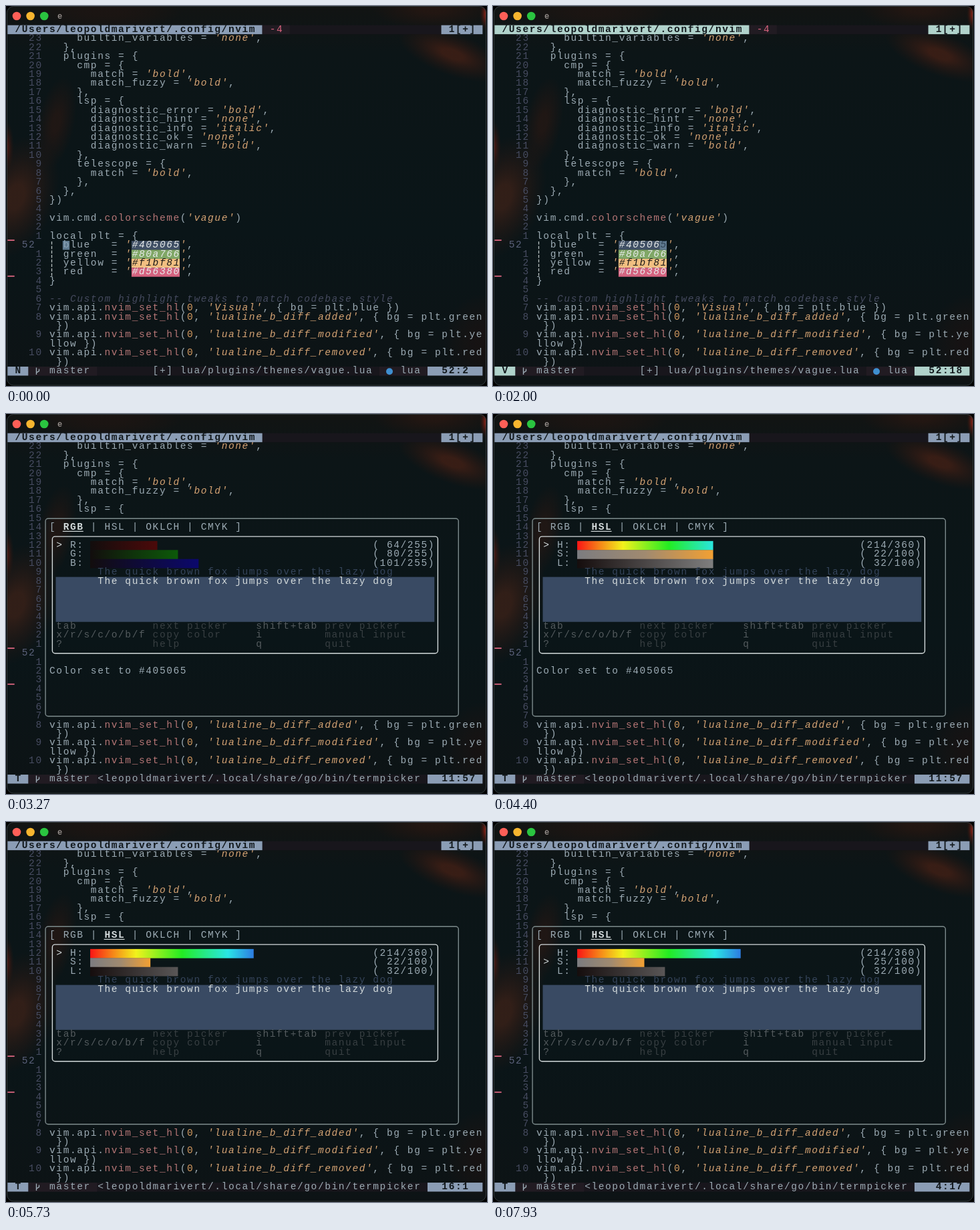
An HTML page with a canvas that plays this animation: 720x568 px, repeating every 8000 ms.

```html
<!DOCTYPE html>
<html lang="en">
<head>
<meta charset="utf-8">
<title>Colour picker in a terminal editor</title>
<style>
  html, body { margin: 0; width: 100%; height: 100%; overflow: hidden; background: #000; }
  canvas { display: block; }
</style>
</head>
<body>
<canvas id="stage" width="720" height="568"></canvas>
<script>
const ctx = document.getElementById('stage').getContext('2d');
const LOOP = 8000, LEFT = 2.4, TOP = 28.7, CELL = 10.304, ROW = 13.43;
const FONT = '14.5px "Liberation Mono", monospace';
const C = {
  text: '#9cabb4', string: '#d6a474', func: '#b67676', number: '#d39a60',
  comment: '#454a5e', lineNo: '#474c61', current: '#5a617a', red: '#d8647e',
  normal: '#8b9db5', visual: '#b0d2cb', ink: '#12181c', bar: '#18161c', barSide: '#211b22',
  popup: '#7d8b8c', white: '#d3dadb', blue: '#394a63', key: '#545b5e', hint: '#383f42'
};

const CODE = `    builtin_variables = 'none',
  },
  plugins = {
    cmp = {
      match = 'bold',
      match_fuzzy = 'bold',
    },
    lsp = {
      diagnostic_error = 'bold',
      diagnostic_hint = 'none',
      diagnostic_info = 'italic',
      diagnostic_ok = 'none',
      diagnostic_warn = 'bold',
    },
    telescope = {
      match = 'bold',
    },
  },
})

vim.cmd.colorscheme('vague')

local plt = {
  blue   = '#405065',
  green  = '#80a766',
  yellow = '#f1bf81',
  red    = '#d56380',
}

-- Custom highlight tweaks to match codebase style
vim.api.nvim_set_hl(0, 'Visual', { bg = plt.blue })
vim.api.nvim_set_hl(0, 'lualine_b_diff_added', { bg = plt.green
 })
vim.api.nvim_set_hl(0, 'lualine_b_diff_modified', { bg = plt.ye
llow })
vim.api.nvim_set_hl(0, 'lualine_b_diff_removed', { bg = plt.red
 })`.split('\n');

const colX = col => LEFT + col * CELL;
const rowY = row => TOP + row * ROW;

function fill(col, row, cols, rows, color) {
  ctx.fillStyle = color;
  ctx.fillRect(colX(col), rowY(row), cols * CELL, rows * ROW);
}

function print(col, row, text, color, style = '') {
  ctx.font = `${style} ${FONT}`;
  ctx.letterSpacing = '0px';
  const gap = CELL - ctx.measureText('0').width;
  ctx.letterSpacing = gap + 'px';
  ctx.fillStyle = color;
  ctx.fillText(text, colX(col) + gap / 2, rowY(row) + 10.1);
}

// Latest value of a [time, value] schedule.
const at = (schedule, t) => schedule.filter(([start]) => start <= t).pop()[1];

// Critically damped spring from one value to another, t in ms.
function spring(from, to, t) {
  const s = 18 * Math.max(0, t) / 1000;
  return to + (from - to) * (1 + s) * Math.exp(-s);
}

// Soft elliptical patch of the blurred wallpaper.
function glow(x, y, rx, ry, angle, color) {
  ctx.save();
  ctx.translate(x, y);
  ctx.rotate(angle);
  ctx.scale(rx, ry);
  const g = ctx.createRadialGradient(0, 0, 0.2, 0, 0, 1);
  g.addColorStop(0, color);
  g.addColorStop(1, 'rgba(60,22,12,0)');
  ctx.fillStyle = g;
  ctx.fillRect(-1, -1, 2, 2);
  ctx.restore();
}

function drawWindow() {
  ctx.fillStyle = '#000';
  ctx.fillRect(0, 0, 720, 568);
  ctx.save();
  ctx.beginPath();
  ctx.roundRect(1, 0, 718, 567, 10);
  ctx.clip();
  const g = ctx.createLinearGradient(0, 0, 0, 568);
  g.addColorStop(0, '#121413');
  g.addColorStop(0.12, '#0c1517');
  g.addColorStop(0.6, '#0a1518');
  g.addColorStop(1, '#0d1315');
  ctx.fillStyle = g;
  ctx.fillRect(0, 0, 720, 568);
  glow(668, 72, 85, 32, 0.35, 'rgba(92,36,20,.55)');
  glow(640, 5, 90, 30, 0, 'rgba(60,26,16,.4)');
  glow(150, 10, 110, 26, 0, 'rgba(45,22,16,.35)');
  glow(15, 285, 60, 95, 0.35, 'rgba(88,40,24,.5)');
  glow(75, 175, 28, 70, 0.2, 'rgba(62,26,16,.4)');
  glow(0, 210, 12, 40, 0, 'rgba(130,30,16,.5)');
  glow(719, 12, 10, 26, 0, 'rgba(190,40,24,.6)');
  glow(715, 500, 60, 70, 0, 'rgba(45,16,12,.3)');
  ctx.restore();
  ctx.strokeStyle = '#30383a';
  ctx.lineWidth = 1;
  ctx.beginPath();
  ctx.roundRect(1.5, 0.5, 717, 566.5, 10);
  ctx.stroke();
  ['#fe5f57', '#f6b52f', '#2ac440'].forEach((color, i) => dot(16 + i * 20.6, 15, 6.3, color));
  ctx.letterSpacing = '0px';
  ctx.font = 'bold 12px "Liberation Mono", monospace';
  ctx.fillStyle = '#918b88';
  ctx.fillText('e', 77, 19);
}

function dot(x, y, r, color) {
  ctx.fillStyle = color;
  ctx.beginPath();
  ctx.arc(x, y, r, 0, 7);
  ctx.fill();
}

function drawCodeLine(row, text) {
  if (text.startsWith('--')) return print(6, row, text, C.comment, 'italic');
  let col = 6;
  for (const part of text.split(/('[^']*'|colorscheme|nvim_set_hl|\b0\b)/)) {
    if (part.startsWith("'#")) {
      const hex = part.slice(1, -1);
      print(col, row, "'       '", C.string, 'italic');
      fill(col + 1, row, 7, 1, hex);
      print(col + 1, row, hex, hex === '#f1bf81' ? '#1b1a18' : '#e6eaea', 'italic');
    } else if (part.startsWith("'")) print(col, row, part, C.string, 'italic');
    else if (part === '0') print(col, row, part, C.number);
    else print(col, row, part, /^(colors|nvim_)/.test(part) ? C.func : C.text);
    col += part.length;
  }
}

function lineLabel(row) {
  if (row < 24) return 24 - row;
  if (row < 33) return row - 24;
  return { 34: 9, 36: 10 }[row] || '';
}

function drawCode(popupOpen) {
  CODE.forEach((text, i) => {
    const row = i + 1;
    if (row === 24) print(2, row, '52', C.current);
    else print(3, row, String(lineLabel(row)).padStart(2), C.lineNo);
    if (!popupOpen || row < 9 || row > 31) drawCodeLine(row, text);
  });
  ctx.fillStyle = C.red;
  for (const row of [24, 28]) ctx.fillRect(LEFT, rowY(row) - 1.8, CELL, 1.8);
  if (popupOpen) return;
  ctx.strokeStyle = '#b8c0c0';
  ctx.lineWidth = 1.3;
  ctx.setLineDash([4.5, 2.2]);
  ctx.beginPath();
  ctx.moveTo(68.5, rowY(24) + 1);
  ctx.lineTo(68.5, rowY(28));
  ctx.stroke();
  ctx.setLineDash([]);
}

function drawCursor(byte) {
  const col = byte + 6;
  fill(col, 24, 1, 1, '#5f7a90');
  print(col, 24, CODE[23][byte], byte > 11 ? '#314558' : '#8fa6b8', byte > 10 ? 'italic' : '');
}

function drawBars(mode, line, column) {
  const accent = mode === 'V' ? C.visual : C.normal;
  const terminal = mode === 'T';
  fill(0, 0, 69, 1, C.bar);
  fill(0, 0, 37, 1, accent);
  print(1, 0, '/Users/leopoldmarivert/.config/nvim', C.ink, 'bold');
  if (!terminal) {
    fill(37, 0, 4, 1, C.barSide);
    print(38, 0, '-4', C.red);
  }
  fill(63, 0, 6, 1, accent);
  print(64, 0, '1[+]', C.ink, 'bold');

  fill(0, 38, 69, 1, C.bar);
  fill(3, 38, 10, 1, C.barSide);
  fill(0, 38, 3, 1, accent);
  print(1, 38, mode, C.ink, 'bold');
  drawBranch();
  print(6, 38, 'master', C.text);
  if (terminal) {
    print(13, 38, '<leopoldmarivert/.local/share/go/bin/termpicker', C.text);
  } else {
    print(21, 38, '[+] lua/plugins/themes/vague.lua', C.text);
    fill(54, 38, 7, 1, C.barSide);
    dot(574, rowY(38) + 7.2, 5, '#3f8fd0');
    print(57, 38, 'lua', C.text);
  }
  fill(61, 38, 8, 1, accent);
  print(62, 38, String(line).padStart(3) + ':' + column, C.ink, 'bold');
}

function drawBranch() {
  const y = rowY(38);
  ctx.strokeStyle = C.text;
  ctx.lineWidth = 1.4;
  ctx.beginPath();
  ctx.moveTo(45.5, y + 1.5);
  ctx.lineTo(45.5, y + 12);
  ctx.moveTo(45.5, y + 9);
  ctx.lineTo(49.5, y + 6.5);
  ctx.lineTo(49.5, y + 3.5);
  ctx.stroke();
}

function frame(col, row, endCol, endRow, color) {
  ctx.strokeStyle = color;
  ctx.lineWidth = 1.4;
  ctx.beginPath();
  ctx.roundRect(colX(col + 0.5), rowY(row + 0.5), (endCol - col) * CELL, (endRow - row) * ROW, 4);
  ctx.stroke();
}

// A bar 40 cells long; "scaled" squeezes the whole gradient into the filled part.
function drawSlider(row, fraction, colors, scaled) {
  const cells = Math.round(fraction * 40);
  if (!cells) return;
  const x = colX(12), width = cells * CELL - 2.6;
  const g = ctx.createLinearGradient(x, 0, x + (scaled ? width : 40 * CELL), 0);
  colors.forEach((color, i) => g.addColorStop(i / (colors.length - 1), color));
  ctx.fillStyle = g;
  ctx.fillRect(x, rowY(row), width, ROW + 0.3);
}

const HUES = Array.from({ length: 13 }, (_, i) => `hsl(${i * 30} ${95 - i * 2.8}% 53%)`);

function sliders(t) {
  if (t < 4400) {
    return [['R', 64, '#f00'], ['G', 80, '#0f0'], ['B', 101, '#00f']].map(([name, value, color]) =>
      ({ name, value, max: 255, shown: spring(0, value / 255, t - 2730), colors: ['#120d0d', color] }));
  }
  const saturation = at([[0, 22], [7470, 23], [7600, 24], [7730, 25]], t);
  const settle = goal => spring(0.5, goal, t - 4400);
  const satShown = t < 7470 ? settle(0.22) : spring(0.22, 0.25, t - 7530);
  return [
    { name: 'H', value: 214, max: 360, shown: settle(214 / 360), colors: HUES },
    { name: 'S', value: saturation, max: 100, shown: satShown, colors: ['#7c7c80', '#a08a70', '#f2a033'], scaled: true },
    { name: 'L', value: 32, max: 100, shown: settle(0.32), colors: ['#150d0d', '#808080', '#fff'] }
  ];
}

function drawPopup(t) {
  frame(5, 9, 65, 31, C.popup);
  frame(6, 11, 62, 24, C.white);

  const activeTab = t < 4400 ? 'RGB' : 'HSL';
  print(6, 10, '[     |     |       |      ]', C.text);
  [['RGB', 8], ['HSL', 14], ['OKLCH', 20], ['CMYK', 28]].forEach(([name, col]) => {
    const active = name === activeTab;
    print(col, 10, name, active ? C.white : C.text, active ? 'bold' : '');
    if (active) {
      ctx.fillStyle = C.white;
      ctx.fillRect(colX(col), rowY(10) + 11.8, name.length * CELL, 1.2);
    }
  });

  const selected = t < 6400 ? 0 : 1;
  sliders(t).forEach(({ name, value, max, shown, colors, scaled }, i) => {
    const row = 12 + i;
    if (i === selected) print(7, row, '>', C.white);
    print(9, row, name + ':', C.text);
    drawSlider(row, shown, colors, scaled);
    print(53, row, `(${String(value).padStart(3)}/${max})`, C.text);
  });

  const sample = 'The quick brown fox jumps over the lazy dog';
  print(13, 15, sample, '#35445a');
  fill(7, 16, 55, 5, C.blue);
  print(13, 16, sample, C.white);

  [['tab', 'next picker', 'shift+tab', 'prev picker'],
   ['x/r/s/c/o/b/f', 'copy color', 'i', 'manual input'],
   ['?', 'help', 'q', 'quit']].forEach((texts, i) =>
    texts.forEach((text, j) => print([7, 21, 36, 46][j], 21 + i, text, j % 2 ? C.hint : C.key)));

  if (t < 5730) print(6, 26, 'Color set to #405065', C.text);
}

const MODE = [[0, 'N'], [1800, 'V'], [2670, 'T']];
const CURSOR = [[0, 2], [330, 5], [530, 9], [670, 12], [870, 18], [1470, 13], [1730, 12], [2000, 18]];
const RULER = [[0, [1, 3]], [2800, [11, 57]], [5730, [16, 1]], [6400, [4, 8]], [7470, [4, 17]]];

function draw(now) {
  const t = now % LOOP;
  const mode = at(MODE, t), popupOpen = mode === 'T', byte = at(CURSOR, t);
  drawWindow();
  drawCode(popupOpen);
  if (popupOpen) drawPopup(t);
  else drawCursor(byte);
  drawBars(mode, ...(popupOpen ? at(RULER, t) : [52, byte]));
  requestAnimationFrame(draw);
}
requestAnimationFrame(draw);
</script>
</body>
</html>
```
